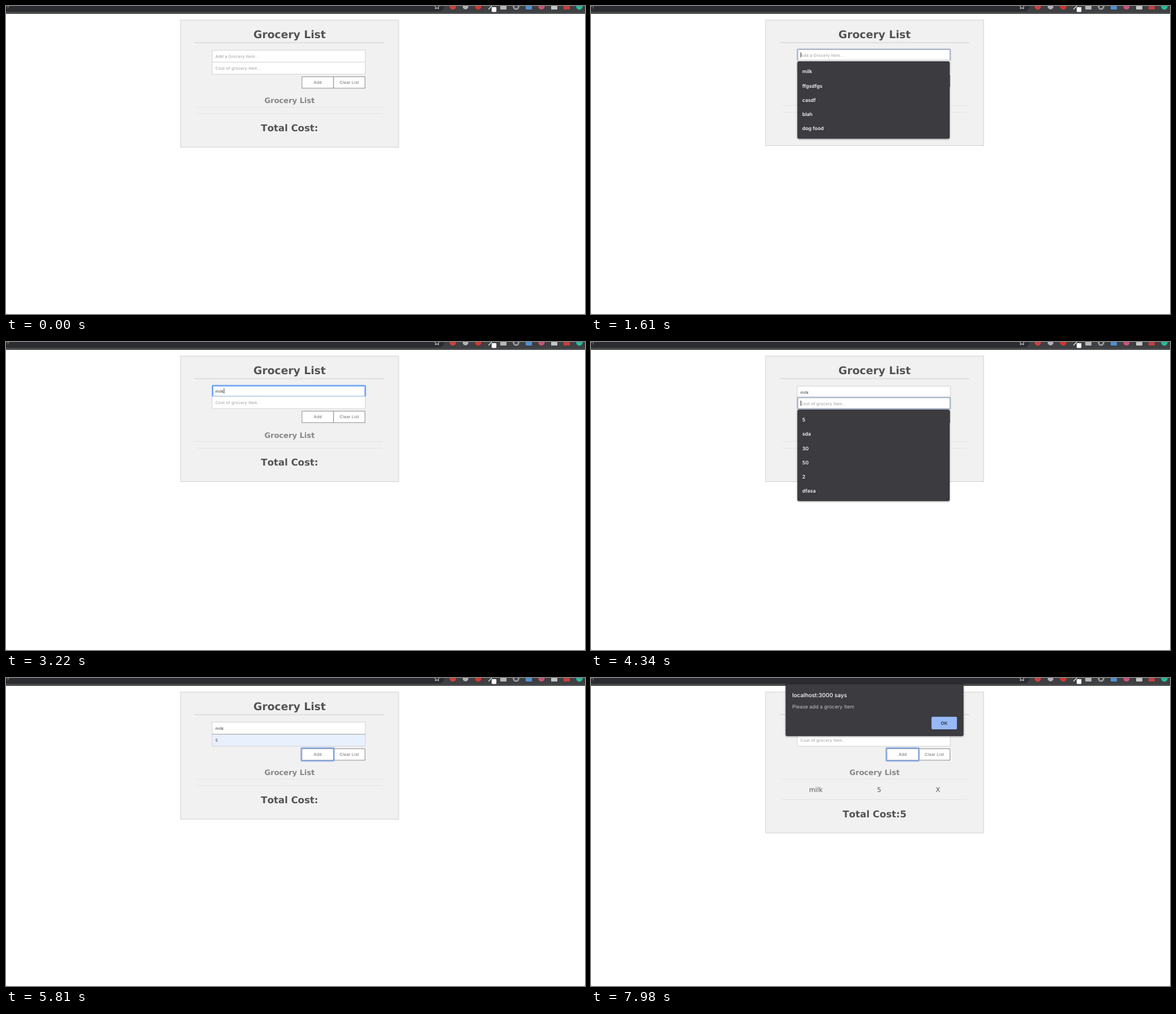
Animation, 1025 px wide and 546 px high, one loop 8000 ms. Source, as an HTML page:

```html
<!DOCTYPE html>
<html lang="en">
<head>
<meta charset="utf-8">
<title>Grocery List</title>
<style>
html, body { margin: 0; width: 100%; height: 100%; overflow: hidden; background: #fff; }
svg { display: block; width: 100%; height: 100%; }
text { white-space: pre; text-rendering: geometricPrecision; }
.head { font-family: "DejaVu Sans", Verdana, sans-serif; font-kerning: none; text-anchor: middle; fill: #535353; }
.bold { font-weight: 700; }
.ui { font-family: Inter, Roboto, sans-serif; }
.small { font-size: 7.2px; letter-spacing: .2px; }
.mid { text-anchor: middle; }
.option { font-size: 8.8px; font-weight: 600; fill: #f4f4f5; }
</style>
</head>
<body>
<svg viewBox="0 0 1025 546">
  <defs>
    <filter id="shadow" x="-10%" y="-20%" width="120%" height="150%">
      <feDropShadow dx="0" dy="1" stdDeviation="1.6" flood-opacity=".4"/>
    </filter>
  </defs>
  <g id="page"></g>
  <g id="toolbar"></g>
  <g id="overlay"></g>
</svg>
<script>
const LOOP = 8000, FADE = 350;
const PANEL = '#3b3a3f';
const byId = id => document.getElementById(id);
const pen = document.createElement('canvas').getContext('2d');

const within = (t, a, b) => t >= a && t < b;
const progress = (t, start, span = FADE) => Math.min(1, Math.max(0, (t - start) / span));
const mix = (a, b, p) => `rgb(${a.map((v, i) => Math.round(v + (b[i] - v) * p))})`;

const rect = (x, y, w, h, fill, more = '') =>
  `<rect x="${x}" y="${y}" width="${w}" height="${h}" fill="${fill}" ${more}/>`;
const line = (x1, x2, y, color) => rect(x1, y - .5, x2 - x1, 1, color);
const circle = (x, y, r, fill) => `<circle cx="${x}" cy="${y}" r="${r}" fill="${fill}"/>`;
const label = (s, x, y, cls, more = '') => `<text x="${x}" y="${y}" class="${cls}" ${more}>${s}</text>`;
const heading = (s, y, size, more = '') => label(s, 502, y, 'head bold', `font-size="${size}" ${more}`);

function textWidth(s) {
  pen.font = '7.2px Inter, Roboto, sans-serif';
  return pen.measureText(s).width + s.length * .2;
}

function ring(x, y, w, h, color, opacity = 1) {
  const frame = (grow, width, alpha) => rect(x - grow, y - grow, w + 2 * grow, h + 2 * grow, 'none',
    `rx="1.5" stroke="${color}" stroke-width="${width}" opacity="${alpha * opacity}"`);
  return frame(.3, 3, .45) + frame(0, 1.8, 1);
}

function button(s, x, w, y) {
  return rect(x, y, w, 20.3, '#fff', 'stroke="#8c8c8c"') +
    label(s, x + w / 2 + .1, y + 12.8, 'ui small mid', 'fill="#666"');
}

// One text field; focus is null or the ring's fade progress.
function field({ y, h, value, hint, fill, focus, caret }) {
  const base = y + h / 2 + 2.6;
  let s = rect(365, y, 271, h, fill, `stroke="#d2d2d2"`);
  if (focus !== null) {
    const gray = 1 - focus;
    s += ring(365.8, y + .4 - gray, 270, h - .9 + gray, mix([186, 186, 186], [96, 155, 245], focus));
  }
  s += label(value || hint, 370.8, base, 'ui small', `fill="${value ? '#333' : '#999'}"`);
  if (caret) s += rect(371 + textWidth(value), base - 7.6, .9, 9, '#222');
  return s;
}

function dropdown(y, items, hover) {
  const row = 25.15;
  let s = rect(365.3, y, 269.7, items.length * row + 11.4, PANEL, 'rx="3" filter="url(#shadow)"');
  items.forEach((item, i) => {
    const top = y + 5.7 + i * row;
    if (hover === i) s += rect(365.3, top, 269.7, row, '#57565b');
    s += label(item, 374, top + row / 2 + 3.2, 'ui option');
  });
  return s;
}

function dialog(opacity) {
  return `<g opacity="${opacity}">` +
    `<path d="M344.5 11H659.5V100a3 3 0 0 1-3 3H347.500a3 3 0 0 1-3-3Z" fill="${PANEL}" filter="url(#shadow)"/>` +
    rect(344.5, 10.2, 315, 1, '#27272a') +
    label('localhost:3000 says', 356.3, 33.7, 'ui', 'font-size="10" font-weight="500" fill="#fff"') +
    label('Please add a grocery Item', 356.3, 54, 'ui', 'font-size="8.7" letter-spacing=".1" fill="#c6c6c9"') +
    rect(602.8, 68.7, 45, 22.3, '#98b9f7', 'rx="2"') +
    label('OK', 625.2, 82.7, 'ui mid', 'font-size="8" font-weight="600" fill="#303034"') + '</g>';
}

function toolbar() {
  const square = (x, fill) => rect(x - 5.5, -4, 11, 10.3, fill, 'rx="1"');
  let rays = '';
  for (let a = 0; a < 360; a += 30)
    rays += `<path d="M903 -2V-5" transform="rotate(${a} 903 1)" stroke="#ddd" stroke-width="1.3"/>`;
  return rect(0, 0, 1025, 13.8, '#3e3f42') +
    '<path d="M0 0H776.500Q775 10 765 10H0Z" fill="#2b2c2f"/>' +
    rect(0, 10.6, 1025, 3.2, '#48494b') +
    label('y?', -3.500, 4.2, 'ui', 'font-size="9" fill="#c9c9cb"') +
    '<path d="M758.500 0L761 1.800 760 5.200 763 3.300 766 5.200 765 1.800 767.500 0" fill="none" stroke="#e2e2e4"/>' +
    circle(791, 1, 5.5, '#d0403c') + circle(813.5, 1, 5, '#b4b4b6') + circle(836, .8, 5.6, '#d8342f') +
    '<path d="M854 6L862 -2" stroke="#d5d5d7" stroke-width="1.6"/>' +
    rect(859.8, 2, 8.3, 8.5, '#fff', 'rx="1"') +
    square(880.5, '#b9b9bb') + rays + square(925.5, '#4d91d6') +
    circle(948, .8, 5.5, '#cf4f79') + square(970.5, '#c6c6c8') +
    square(992.5, '#c33f3d') + circle(1015, 1, 5.7, '#2bb896');
}

function state(t) {
  const added = t >= 5880;
  const typed = t < 2590 ? 0 : t < 2870 ? 1 : t < 3010 ? 2 : t < 3220 ? 3 : 4;
  const first = within(t, 1540, 4270), second = within(t, 4270, 5670);
  return {
    added, first, second,
    item: added ? '' : 'milk'.slice(0, typed),
    cost: within(t, 4900, 5880) ? '5' : '',
    caret1: first && !within(t, 2100, 2590) && !within(t, 3780, 4270),
    caret2: second && !within(t, 4830, 5110),
    costFill: t < 5110 ? '#fff' : mix([232, 240, 254], [255, 255, 255], progress(t, 5880)),
    clearRing: within(t, 1190, 1540) ? progress(t, 1120, 280) : 0,
    addRing: t < 5670 ? 0 : t < 6790 ? .5 + .5 * progress(t, 5670, 140)
      : t < 7200 ? 1 - progress(t, 6720, 140) : progress(t, 7140)
  };
}

function page(t, s) {
  const lift = s.first || s.second ? -2.8 : 0;
  const grow = lift + (s.added ? 24.5 : 0);
  const btnY = 125.4 + lift;
  const y2 = s.first ? 96.6 : 99.5 + (s.second ? -.7 : 0);
  let out = rect(309, 25, 386, 225.3 + grow, '#f1f1f1', 'stroke="#cfcfcf"') +
    heading('Grocery List', 56.7, 18.8) + line(334, 670, 65, '#cdcdcd') +
    field({ y: s.first ? 77.2 : 78.3, h: s.first ? 20 : 21.2, value: s.item, hint: 'Add a Grocery Item...',
      fill: '#fff', focus: s.first ? progress(t, 1540) : null, caret: s.caret1 }) +
    field({ y: y2, h: s.second ? 20.2 : 21.5, value: s.cost, hint: 'Cost of grocery Item...',
      fill: s.costFill, focus: s.second ? progress(t, 4270) : null, caret: s.caret2 });
  if (within(t, 5670, 6020)) out += line(365, 636, 99.7, mix([130, 130, 130], [210, 210, 210], progress(t, 5670)));
  out += button('Add', 523.9, 56, btnY) + button('Clear List', 579.9, 55.6, btnY);
  if (s.addRing) out += ring(522.8, btnY - 1.2, 57.8, 22.6, '#86a9e6', s.addRing);
  if (s.clearRing) out += ring(578.8, btnY - 1.2, 57.6, 22.6, '#86a9e6', s.clearRing);
  out += heading('Grocery List', 172.3 + lift, 13.05, 'style="fill:#858585"') +
    line(336, 666, 179.2 + lift, '#e3e3e3') + line(337, 665, 191 + grow, '#e3e3e3') +
    heading('Total Cost:' + (s.added ? '5' : ''), 222 + grow, 16.6);
  if (s.added)
    [['milk', 398], ['5', 510], ['X', 614.2]].forEach(([word, x]) =>
      out += label(word, x, 201.8, 'head', 'font-size="11.4"'));
  return out + rect(0, 545, 1.5, 1, '#aaa') + rect(1024, 545, 1, 1, '#aaa');
}

function overlay(t) {
  if (within(t, 1610, 3220))
    return dropdown(98, t < 2660 ? ['milk', 'ffgsdfgs', 'casdf', 'blah', 'dog food'] : ['milk']);
  if (within(t, 4340, 5110))
    return dropdown(119.8, ['5', 'sda', '30', '50', '2', 'dfasa'], t >= 4900 ? 0 : -1);
  return t >= 7700 ? dialog(progress(t, 7640, 210)) : '';
}

function draw(t) {
  byId('page').innerHTML = page(t, state(t));
  byId('overlay').innerHTML = overlay(t);
}

byId('toolbar').innerHTML = toolbar();
const start = performance.now();
function tick() {
  draw((performance.now() - start) % LOOP);
  requestAnimationFrame(tick);
}
tick();
</script>
</body>
</html>
```
